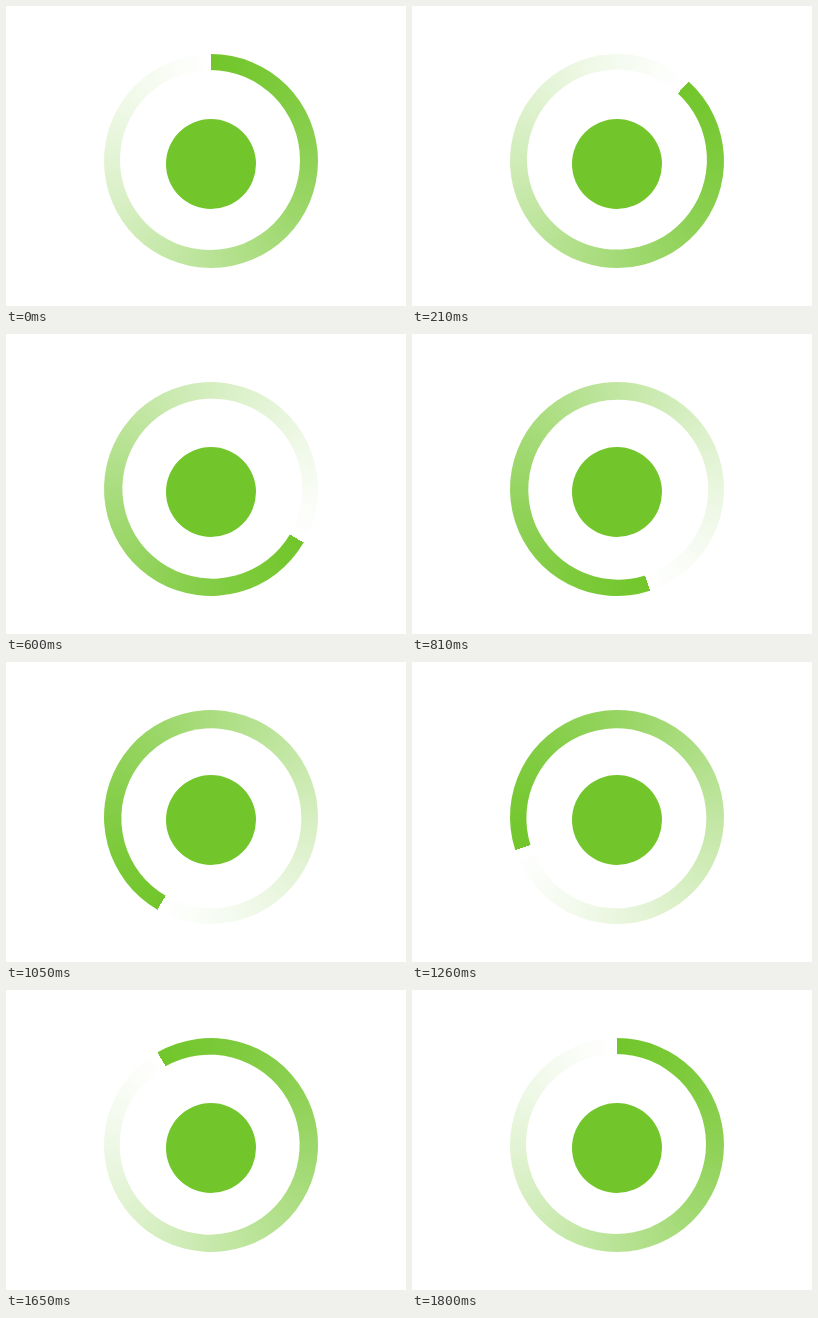
An HTML page for the animation above (1.83 s loop, 400 px wide and 300 px high).

```html
<!DOCTYPE html>
<html lang="en">
<head>
<meta charset="utf-8">
<title>Loading ring</title>
<style>
  html, body { margin: 0; width: 100%; height: 100%; overflow: hidden; background: #fff; }
  div { position: absolute; border-radius: 50%; }
  #ring { left: 98px; top: 48px; width: 214px; height: 214px; }
  #hole { left: 16px; top: 16px; width: 180px; height: 180px; background: #fff; }
  #badge { left: 160px; top: 113px; width: 90px; height: 90px; background: #72c62b; }
</style>
</head>
<body>
<div id="ring"><div id="hole"></div></div>
<div id="badge"></div>
<script>
  const LOOP = 1830, STEP = 30, TURN = 6, STOPS = 24;
  const GREEN = [114, 198, 43];
  const ring = document.getElementById('ring');
  const start = performance.now();

  // halfway between a linear fade and a smoothstep
  const fade = t => (t + t * t * (3 - 2 * t)) / 2;

  const stops = Array.from({ length: STOPS + 1 }, (_, i) => {
    const t = i / STOPS;
    const rgb = GREEN.map(c => c + (255 - c) * fade(t));
    return `rgb(${rgb.join(' ')}) ${t * 360}deg`;
  });
  ring.style.background = `conic-gradient(${stops.join(', ')})`;

  function draw(now) {
    const time = Math.max(0, now - start) % LOOP;
    const angle = Math.floor(time / STEP) * TURN % 360;
    ring.style.transform = `rotate(${angle}deg)`;
    requestAnimationFrame(draw);
  }
  draw(start);
</script>
</body>
</html>
```
